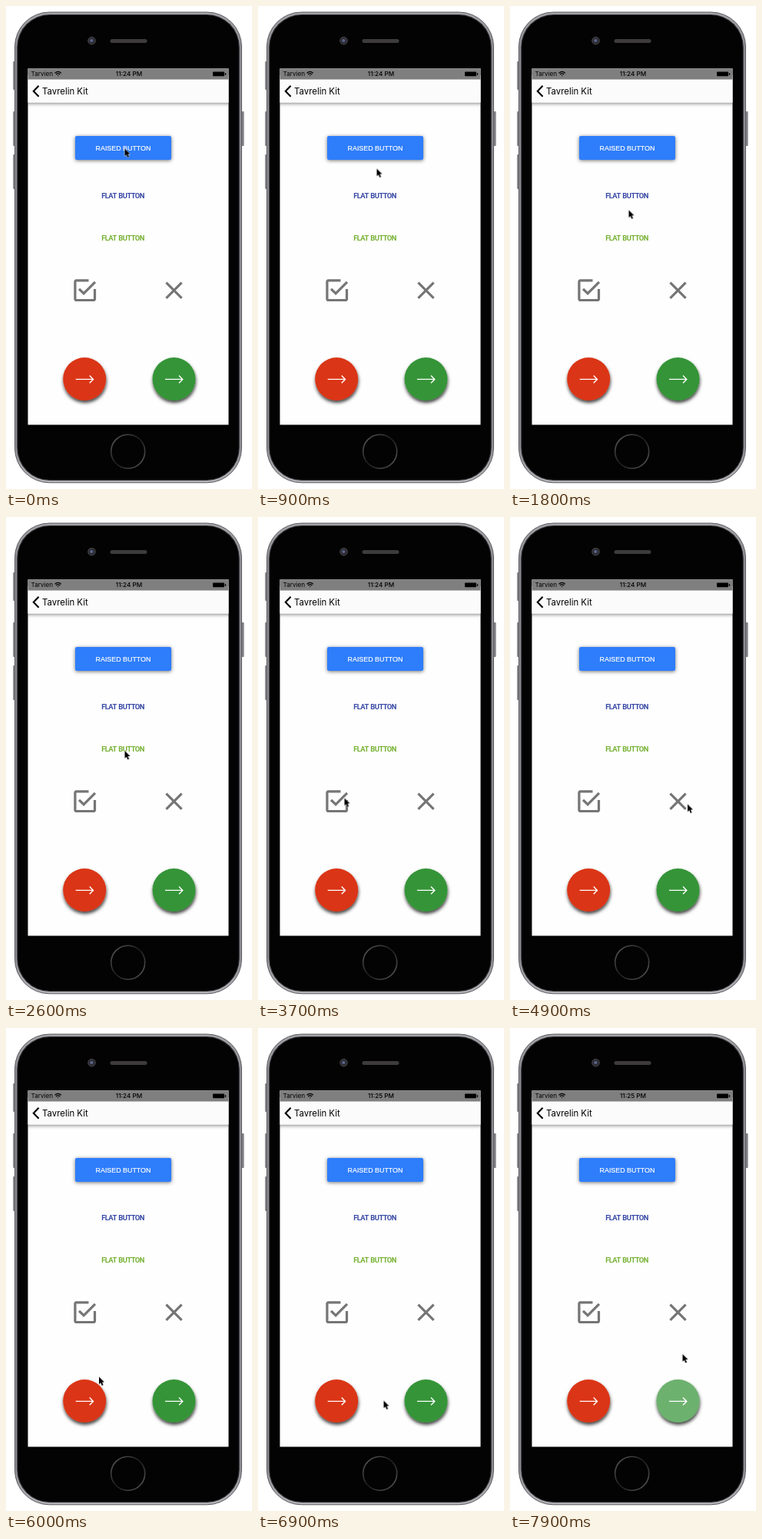
Animation, 320 px wide and 628 px high, one loop 8000 ms. Source, as an HTML page:

```html
<!DOCTYPE html>
<html lang="en">
<head>
<meta charset="utf-8">
<title>Button demo</title>
<style>
  html, body { margin: 0; width: 100%; height: 100%; overflow: hidden; background: #fff; }
  svg { display: block; width: 100vw; height: 100vh; font-family: Inter, Roboto, sans-serif; }
  .status { font-size: 8.2px; }
  .title { font-size: 11.4px; }
  .label { text-anchor: middle; }
  .raised { font: 8.9px "Liberation Sans", Arial, sans-serif; fill: #fff; stroke: #fff; stroke-width: .2; }
  .flat { font: 700 9.4px Roboto, "Liberation Sans", sans-serif; letter-spacing: -.55px; word-spacing: 1px; }

  .ripple {
    opacity: 0;
    transform-box: fill-box;
    transform-origin: center;
    animation: ripple var(--span, 500ms) var(--at) linear;
  }
  @keyframes ripple {
    0% { transform: scale(.1); opacity: .28; animation-timing-function: ease-out; }
    45%, 70% { transform: scale(1); opacity: .28; }
    100% { transform: scale(1); opacity: 0; }
  }

  #cursor { animation: point 8s linear infinite; }
  @keyframes point {
    0%, 7.5% { transform: translate(154.5px, 185.5px); }
    11.25% { transform: translate(154.5px, 211.5px); }
    15%, 21.25% { transform: translate(154.5px, 246px); }
    25%, 33.75% { transform: translate(154.5px, 304px); }
    37.5%, 46.25% { transform: translate(112.5px, 365.5px); }
    53.75%, 63.75% { transform: translate(231px, 373.5px); }
    70% { transform: translate(155px, 428px); }
    75% { transform: translate(121px, 453.5px); }
    78.75%, 83.75% { transform: translate(106px, 485px); }
    88.75%, 93.75% { transform: translate(221px, 484px); }
    98.75%, 100% { transform: translate(224.5px, 424px); }
  }
</style>
</head>
<body>
<svg viewBox="0 0 320 628" preserveAspectRatio="none">
  <defs>
    <linearGradient id="rim" x2="0" y2="1">
      <stop offset="0" stop-color="#a4a4a8"/>
      <stop offset=".08" stop-color="#8c8c92"/>
      <stop offset=".92" stop-color="#8c8c92"/>
      <stop offset="1" stop-color="#b4b4b8"/>
    </linearGradient>
    <linearGradient id="ring" x2="1" y2="1">
      <stop offset="0" stop-color="#626262"/>
      <stop offset=".5" stop-color="#1c1c1c"/>
      <stop offset="1" stop-color="#626262"/>
    </linearGradient>
    <filter id="soft" x="-30%" y="-50%" width="160%" height="200%">
      <feDropShadow dx="0" dy="1" stdDeviation="2.4" flood-opacity=".55"/>
    </filter>
    <filter id="deep" x="-30%" y="-30%" width="160%" height="160%">
      <feDropShadow dx=".5" dy="3" stdDeviation="2" flood-opacity=".75"/>
    </filter>
    <clipPath id="screen"><rect x="28.5" y="81.3" width="261" height="463.3"/></clipPath>
    <clipPath id="raised"><rect x="90" y="169" width="125" height="31" rx="2"/></clipPath>
    <clipPath id="flatA"><rect x="90" y="231" width="125" height="31" rx="2"/></clipPath>
    <clipPath id="flatB"><rect x="90" y="286" width="125" height="31" rx="2"/></clipPath>
    <clipPath id="red"><circle cx="102.2" cy="485" r="28"/></clipPath>
    <clipPath id="green"><circle cx="218.5" cy="485" r="28"/></clipPath>
    <path id="arrow" d="M-11.5 0H11M6.5-4.8 11.3 0 6.5 4.8" fill="none" stroke="#fff" stroke-width="1.4"/>
  </defs>

  <!-- phone -->
  <g fill="#808086">
    <rect x="9.2" y="72" width="4" height="37" rx="1"/>
    <rect x="9.2" y="137" width="4" height="45" rx="1"/>
    <rect x="9.2" y="193" width="4" height="45" rx="1"/>
    <rect x="305" y="137" width="4.6" height="45" rx="1"/>
  </g>
  <rect x="11.5" y="8" width="295" height="611.8" rx="45" fill="url(#rim)" stroke="#5d5d62"/>
  <rect x="14.3" y="10.9" width="289.4" height="606" rx="42.5" fill="#2c2c2f"/>
  <rect x="15.4" y="12" width="287.2" height="603.8" rx="41.5" fill="#030303"/>
  <circle cx="111.5" cy="45.2" r="4.8" fill="#2b2b31" stroke="#48484d"/>
  <circle cx="111.3" cy="45" r="2.1" fill="#5a648c"/>
  <rect x="135.5" y="43" width="48" height="5" rx="2.5" fill="#3d3b3c"/>
  <circle cx="158.7" cy="579.2" r="22" fill="#030303" stroke="url(#ring)" stroke-width="1.6"/>

  <g clip-path="url(#screen)">
    <rect x="28" y="81" width="262" height="464" fill="#fefefe"/>
    <rect x="10" y="90" width="298" height="35.5" fill="#fbfbfb" filter="url(#soft)"/>
    <rect x="28" y="81" width="262" height="14.5" fill="#7f7f7f"/>
    <g class="status">
      <text x="32.5" y="91.3">Tarvien</text>
      <text id="clock" class="label" x="160" y="91.3" font-weight="500">11:24 PM</text>
    </g>
    <g fill="none" stroke="#000" stroke-width="1.2">
      <path d="M63.6 87.2q4.1-3.8 8.2 0M65.1 89q2.6-2.4 5.2 0"/>
      <path d="M66.6 90.3h2.2l-1.1 1.2z" fill="#000" stroke="none"/>
      <rect x="269" y="85.6" width="15" height="5.6" rx="1" fill="#000" stroke="none"/>
      <path d="M285.5 87v3"/>
    </g>
    <path d="M42.6 103.8 35.8 110.8 42.6 117.8" fill="none" stroke="#000" stroke-width="2.1"/>
    <text class="title" x="47" y="114.8">Tavrelin Kit</text>
  </g>

  <!-- text buttons -->
  <rect x="90" y="169" width="125" height="31" rx="2" fill="#2d7dfb" filter="url(#soft)"/>
  <text class="label raised" x="152.5" y="187.8">RAISED BUTTON</text>
  <text class="label flat" x="152" y="249.8" fill="#3748a6">FLAT BUTTON</text>
  <text class="label flat" x="152" y="304.8" fill="#76b133">FLAT BUTTON</text>

  <!-- icons, on a 24 unit grid -->
  <g fill="#757575">
    <path transform="translate(83.5 350.5) scale(1.6)"
      d="M19 19H5V5h10V3H5c-1.1 0-2 .9-2 2v14c0 1.1.9 2 2 2h14c1.1 0 2-.9 2-2v-8h-2zM7.9 10.100 6.500 11.500 11 16 21 6 19.600 4.600 11 13.200z"/>
    <path transform="translate(199.3 350.5) scale(1.6)"
      d="M19 6.400 17.600 5 12 10.600 6.400 5 5 6.400 10.600 12 5 17.600 6.400 19 12 13.400 17.600 19 19 17.600 13.400 12z"/>
  </g>

  <!-- round buttons -->
  <circle cx="102.2" cy="485" r="28" fill="#da3516" filter="url(#deep)"/>
  <circle cx="218.5" cy="485" r="28" fill="#359437" filter="url(#deep)"/>
  <use href="#arrow" x="102.2" y="485.4"/>
  <use href="#arrow" x="218.5" y="485.4"/>

  <!-- touch feedback -->
  <g clip-path="url(#raised)"><circle class="ripple" cx="154.5" cy="185" r="68" fill="#fff" style="--at:300ms"/></g>
  <g clip-path="url(#flatA)"><circle class="ripple" cx="154.5" cy="246" r="68" fill="#3748a6" style="--at:1300ms"/></g>
  <g clip-path="url(#flatB)"><circle class="ripple" cx="154.5" cy="302" r="68" fill="#76b133" style="--at:2050ms"/></g>
  <circle class="ripple" cx="102.5" cy="370" r="24" fill="#757575" style="--at:3100ms"/>
  <circle class="ripple" cx="218.5" cy="370" r="24" fill="#757575" style="--at:4350ms"/>
  <g clip-path="url(#red)"><circle class="ripple" cx="106" cy="485" r="34" fill="#fff" style="--at:6300ms"/></g>
  <g clip-path="url(#green)"><circle class="ripple" cx="221" cy="484" r="34" fill="#fff" style="--at:7300ms;--span:900ms"/></g>

  <path id="cursor" d="M0 0V9.800L2.200 7.800 3.800 11.500 5.600 10.700 4 7.100H7Z" stroke="#fff" stroke-width=".9" paint-order="stroke"/>
</svg>
<script>
  const LOOP = 8000, STEP = 100, MINUTE_AT = 6800;
  const clock = document.getElementById("clock");
  const motions = document.getAnimations();
  motions.forEach(m => m.pause());
  const start = performance.now();

  function draw() {
    const t = Math.floor(((performance.now() - start) % LOOP) / STEP) * STEP;
    motions.forEach(m => { m.currentTime = t; });
    clock.textContent = t < MINUTE_AT ? "11:24 PM" : "11:25 PM";
    requestAnimationFrame(draw);
  }
  draw();
</script>
</body>
</html>
```
